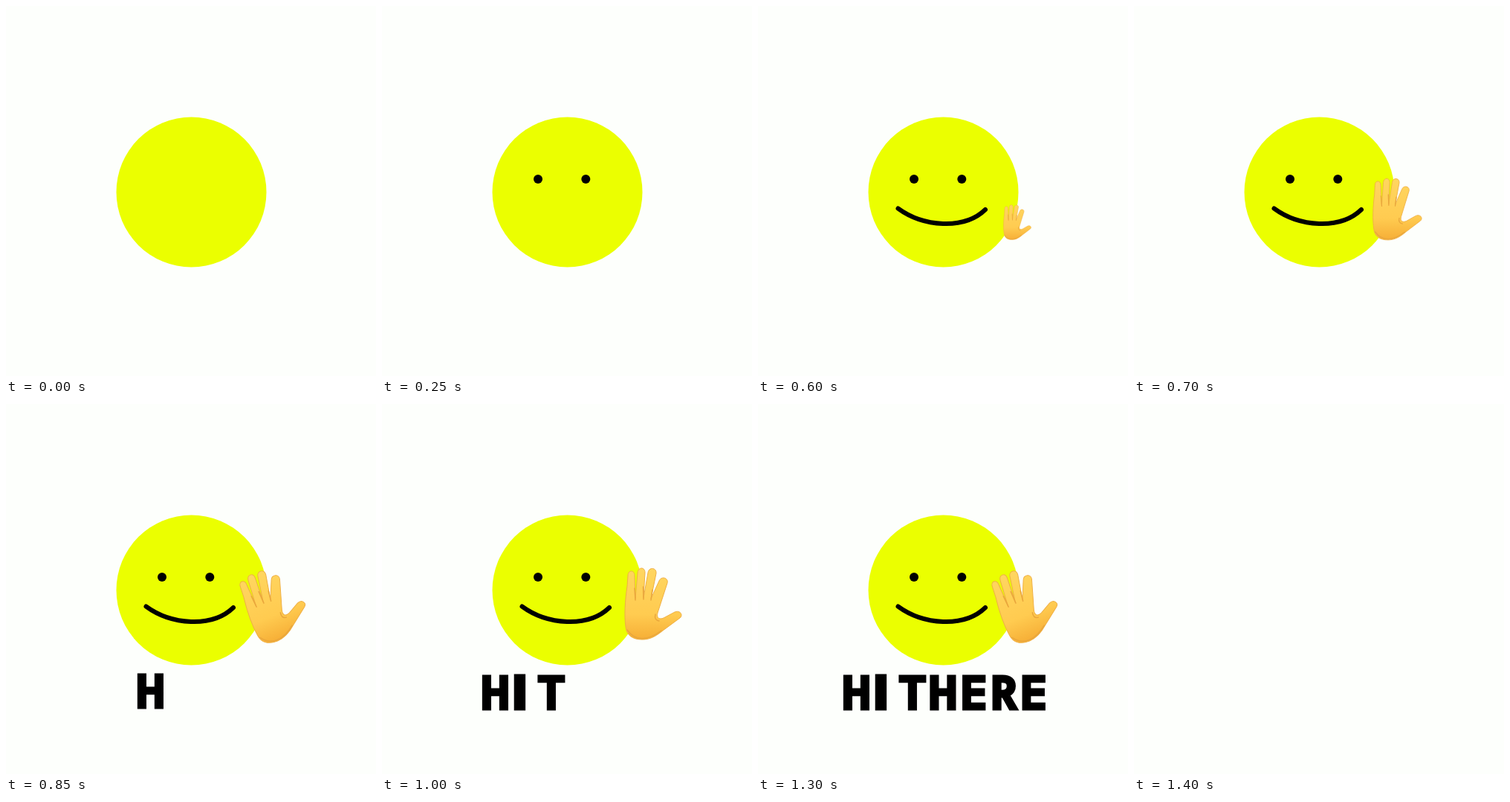
Recreate the animation shown at these times as an HTML page. Size 498x498 px, loop 1450 ms.

```html
<!DOCTYPE html>
<html lang="en">
<head>
<meta charset="utf-8">
<title>Hi there</title>
<style>
  html, body { margin: 0; width: 100%; height: 100%; overflow: hidden; background: #fdfffc; }
  svg { display: block; width: 100vw; height: 100vh; }
  #smile { fill: none; stroke: #000; stroke-width: 6; stroke-linecap: round; }
  #word { font: 900 63px "Noto Sans Mono", monospace; text-anchor: middle; fill: #000; stroke: #000; stroke-width: 3; }
  #word .bar { font-family: Inter, sans-serif; }
</style>
</head>
<body>
<svg viewBox="0 0 498 498">
  <defs>
    <linearGradient id="skin" x1="0" y1="0" x2="0" y2="1">
      <stop offset="0" stop-color="#ffd660"/>
      <stop offset=".65" stop-color="#ffcb50"/>
      <stop offset="1" stop-color="#f6ae36"/>
    </linearGradient>
  </defs>
  <g id="scene">
    <circle cx="249.5" cy="250.5" r="101" fill="#ebff00"/>
    <circle id="leftEye" cx="210" cy="233" r="6"/>
    <circle id="rightEye" cx="274.3" cy="233" r="6"/>
    <path id="smile" pathLength="100" d="M188.500 272.500C222 297 277 302 306 274"/>
    <g id="hand">
      <path fill="url(#skin)" stroke="#efb044" d="M328 300C326 285 327 265 330 245L331 231C331 223 340 223 340 231L341 262L344 227C345 219 354 219 354 227L352 261L358 227C359 219 370 220 369 228L362 262L373 238C376 231 386 234 384 241L371 281C369 289 374 290 379 288L394 280C401 277 406 284 401 288L378 305C366 315 358 317 350 317C337 317 329 311 328 300Z"/>
      <path fill="none" stroke="#e9a63c" stroke-width="1.500" stroke-linecap="round" d="M340 248L341 264M351.500 246L352 263M364 250L362 264M368 283Q366 291 373 292M330 304Q338 316 351 315.500Q363 315 376 305"/>
    </g>
    <g id="word"></g>
  </g>
</svg>
<script>
const LOOP = 1450, STEP = 50;
const byId = id => document.getElementById(id);
const show = (el, on) => el.setAttribute("visibility", on ? "inherit" : "hidden");

// Each letter: character, centre x, time it is typed
const letters = [
  ["H", 152.5, 800], ["I", 185.5, 900], ["T", 228, 950], ["H", 269, 1050],
  ["E", 310.5, 1150], ["R", 351, 1250], ["E", 391, 1300]
].map(([char, x, time]) => {
  const el = document.createElementNS("http://www.w3.org/2000/svg", "text");
  el.textContent = char;
  el.setAttribute("x", x);
  el.setAttribute("y", 410.5);
  if (char === "I") el.setAttribute("class", "bar");
  byId("word").append(el);
  return { el, time };
});

// Hand pose: time, dx, dy, angle, scale
const poses = [
  [550, -8, -2, -1, .3], [700, -8, -2, -1, .86], [850, 15, 2, -22, 1],
  [1000, 0, 0, 0, 1], [1100, 15, 2, -22, 1], [1200, 2, 5, 3, 1],
  [1300, 15, 2, -22, 1], [1400, 0, 0, 0, 1]
];

function poseAt(t) {
  const i = Math.max(1, poses.findIndex(p => p[0] >= t));
  const a = poses[i - 1], b = poses[i];
  const k = Math.max(0, (t - a[0]) / (b[0] - a[0]));
  return a.map((v, j) => v + (b[j] - v) * k);
}

function draw(t) {
  show(byId("scene"), t < 1400);
  show(byId("leftEye"), t >= 200);
  show(byId("rightEye"), t >= 250);

  const drawn = Math.min(1, Math.max(0, (t - 250) / 150));
  show(byId("smile"), drawn > 0);
  byId("smile").style.strokeDasharray = drawn < 1 ? `${drawn * 100} 200` : "none";

  show(byId("hand"), t >= 550);
  const [, dx, dy, angle, scale] = poseAt(Math.min(t, 1400));
  byId("hand").setAttribute("transform",
    `translate(${350 + dx} ${316 + dy}) rotate(${angle}) scale(${scale}) translate(-350 -316)`);

  const shift = t < 950 ? [42, -2] : t < 1250 ? [0, 0] : [-20, 0];
  byId("word").setAttribute("transform", `translate(${shift})`);
  letters.forEach(({ el, time }) => show(el, t >= time));
}

function tick() {
  draw(Math.floor(performance.now() % LOOP / STEP) * STEP);
  requestAnimationFrame(tick);
}
tick();
</script>
</body>
</html>
```
